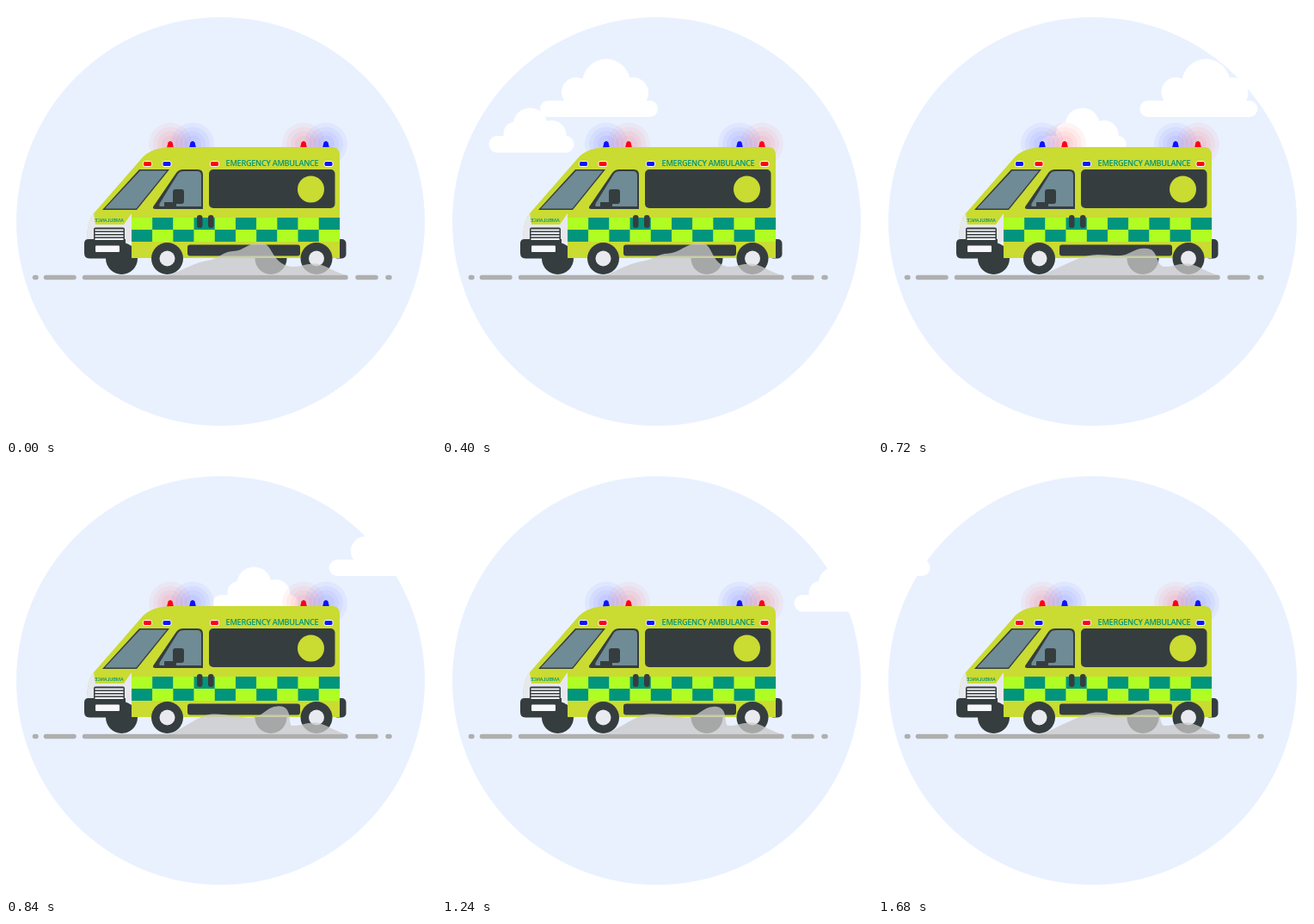
Recreate the animation shown at these times as an HTML page. Size 500 by 501 pixels, loop 1.72 s.

```html
<!DOCTYPE html>
<html lang="en">
<head>
<meta charset="utf-8">
<title>Ambulance</title>
<style>
  html, body { margin: 0; height: 100%; overflow: hidden; background: #fff; }
  svg { display: block; width: 100%; height: 100%; }
  text { font-family: "Open Sans", "Noto Sans", sans-serif; font-weight: 600; letter-spacing: -.035em; fill: #00957c; text-anchor: middle; }
  .dark { fill: #363d3f; }
  .glass { fill: #6f8b95; }
  .pale { fill: #e6e8ee; }
  .lime { fill: #cadb32; }
</style>
</head>
<body>
<svg viewBox="0 0 500 501">
  <circle cx="249.5" cy="250.5" r="237.5" fill="#e9f1ff"/>

  <g id="bigCloud" fill="#fff">
    <rect y="110" width="137" height="19" rx="9.5"/>
    <circle cx="42" cy="100" r="17"/>
    <circle cx="77" cy="89.5" r="28"/>
    <circle cx="108" cy="101" r="18"/>
    <rect x="28" y="96" width="92" height="20"/>
  </g>
  <g id="smallCloud" fill="#fff">
    <rect y="151" width="99" height="19.5" rx="9.7"/>
    <circle cx="30" cy="148" r="13"/>
    <circle cx="48" cy="138.5" r="20"/>
    <circle cx="73" cy="150" r="17"/>
  </g>

  <g id="beacons"></g>

  <path d="M33.5 315.5H35M46.5 315.5H79M91.5 315.5H395M409 315.5H430M444 315.5H446"
    stroke="#afafaf" stroke-width="5.5" stroke-linecap="round"/>

  <g class="dark">
    <circle cx="134.5" cy="293.5" r="18.5"/>
    <circle cx="308" cy="293.5" r="18.5"/>
    <rect x="380" y="271" width="15.5" height="22.5" rx="5"/>
  </g>

  <path class="lime" d="M94 274Q94 250 102 241L157 178Q168 164 194 164H380Q388 164 388 174V293H146V274Z"/>
  <path class="pale" d="M94 274Q94 250 102 241L104 254H137L146 241V274Z"/>
  <g id="checks"></g>

  <path class="dark" d="M155 190H190L152 237H112Z"/>
  <path class="glass" d="M156 191.5H187L151.500 235.500H115Z"/>
  <path class="dark" d="M206 190H223Q229 190 229 196V236H174Q169 236 172 232L198 194Q201 190 206 190Z"/>
  <path class="glass" d="M207 192H222Q227 192 227 197V233H180Q177 233 179 229L200 195Q202 192 207 192Z"/>
  <path class="dark" d="M197 213H204Q207 213 207 216V227Q207 230 204 230H197Q194 230 194 227V216Q194 213 197 213ZM184 228H198V234H184Z"/>

  <rect class="dark" x="236" y="190" width="146.5" height="45" rx="5"/>
  <circle cx="354.5" cy="213" r="15.5" fill="#cadb32"/>
  <g class="dark">
    <rect x="222" y="243" width="6.5" height="15" rx="3"/>
    <rect x="235" y="243" width="6.5" height="15" rx="3"/>
    <rect x="211" y="277.5" width="131" height="13" rx="3"/>
    <rect x="102" y="257.5" width="36" height="15" rx="2"/>
    <path d="M96 271H139V293.5H97Q91 293.5 91 287V276Q91 271 96 271Z"/>
  </g>
  <path d="M103.5 260.5H136.5M103.5 264H136.5M103.5 267.5H136.5M103.5 271H136.5" stroke="#f1f2f5" stroke-width="2"/>
  <rect x="104" y="278.5" width="28" height="7.5" rx="1" fill="#f6f7f9"/>

  <text x="309.5" y="186" font-size="9.2">EMERGENCY AMBULANCE</text>
  <text transform="translate(120 250.500) scale(-1 1)" font-size="5.7">AMBULANCE</text>

  <g id="wheels"></g>
  <g id="pills" stroke="#fff"></g>
  <path id="smoke" fill="#c9c9c9" fill-opacity=".76"/>
</svg>

<script>
const $ = id => document.getElementById(id);
const LOOP = 1720, STEP = 40, CYCLE = 1600;
const SMOKE_TIME = 196, FLASH_TIME = CYCLE / 6;

// Crest of the exhaust: time, then first hump, dip, second hump.
const smokeKeys = [
  [0,   234, 296, 264, 285, 294, 275],
  [12,  232, 297, 262, 289, 301, 275],
  [50,  236, 290, 285, 294, 316, 280],
  [112, 250, 288, 285, 292, 314, 284],
  [196, 234, 296, 264, 285, 294, 275]
];

for (let i = 0; i < 10; i++) for (let row = 0; row < 2; row++)
  $('checks').innerHTML += `<rect x="${146 + i * 24.2}" y="${246 + row * 14}" width="24.3" height="14"
    fill="${(i + row) % 2 ? '#00957c' : '#b0fd24'}"/>`;

for (const x of [187.5, 361])
  $('wheels').innerHTML += `<circle class="dark" cx="${x}" cy="293.5" r="18.5"/><circle cx="${x}" cy="293.5" r="9" fill="#e9eaf0"/>`;

[191, 217, 346, 372].forEach((x, i) => {
  const rings = [25, 20, 15, 10].map(r => `<circle cx="${x}" cy="160.5" r="${r}" fill-opacity=".045"/>`).join('');
  $('beacons').innerHTML += `<g class="lamp${i % 2}">${rings}<path d="M${x - 4} 165l1.5-6.500q2.500-3 5 0l1.500 6.500z"/></g>`;
});

[164.5, 187, 242.5, 375].forEach((x, i) =>
  $('pills').innerHTML += `<rect class="lamp${i % 2}" x="${x - 5}" y="180.5" width="10" height="6" rx="2"/>`);

const lamps = [0, 1].map(i => document.querySelectorAll('.lamp' + i));
const lerp = (a, b, k) => a + (b - a) * k;
const clamp = v => Math.max(0, Math.min(1, v));

function lampColor(blue) {
  return `rgb(${lerp(255, 12, blue)},${lerp(0, 20, blue)},${lerp(20, 255, blue)})`;
}

function smokePath(t) {
  const phase = t % SMOKE_TIME;
  const n = smokeKeys.findIndex(key => key[0] > phase);
  const a = smokeKeys[n - 1], b = smokeKeys[n];
  const k = (phase - a[0]) / (b[0] - a[0]);
  const [x1, y1, x2, y2, x3, y3] = a.slice(1).map((v, i) => lerp(v, b[i + 1], k));
  return `M190 313C207 306 ${x1 - 14} ${y1 + 2} ${x1} ${y1}S${x2 - 12} ${y2} ${x2} ${y2}
    S${x3 - 12} ${y3} ${x3} ${y3}C${x3 + 18} ${y3 - 1} ${x3 + 12} 299 332 303
    C342 304 352 298 363 300S382 310 397 313Z`;
}

function draw(t) {
  const c = t % CYCLE;
  $('bigCloud').setAttribute('transform', `translate(${114 + 0.595 * (c - 400)})`);
  $('smallCloud').setAttribute('transform', `translate(${54.5 + 0.4226 * (c - 400)})`);
  const blue = clamp(0.5 - 1.1 * Math.cos((c - 40) / FLASH_TIME * 2 * Math.PI));
  lamps.forEach((set, i) => set.forEach(el => el.setAttribute('fill', lampColor(i ? 1 - blue : blue))));
  $('smoke').setAttribute('d', smokePath(t));
}

const start = performance.now();
function tick() {
  const t = (performance.now() - start) % LOOP;
  draw(Math.floor(t / STEP) * STEP);
  requestAnimationFrame(tick);
}
tick();
</script>
</body>
</html>
```
